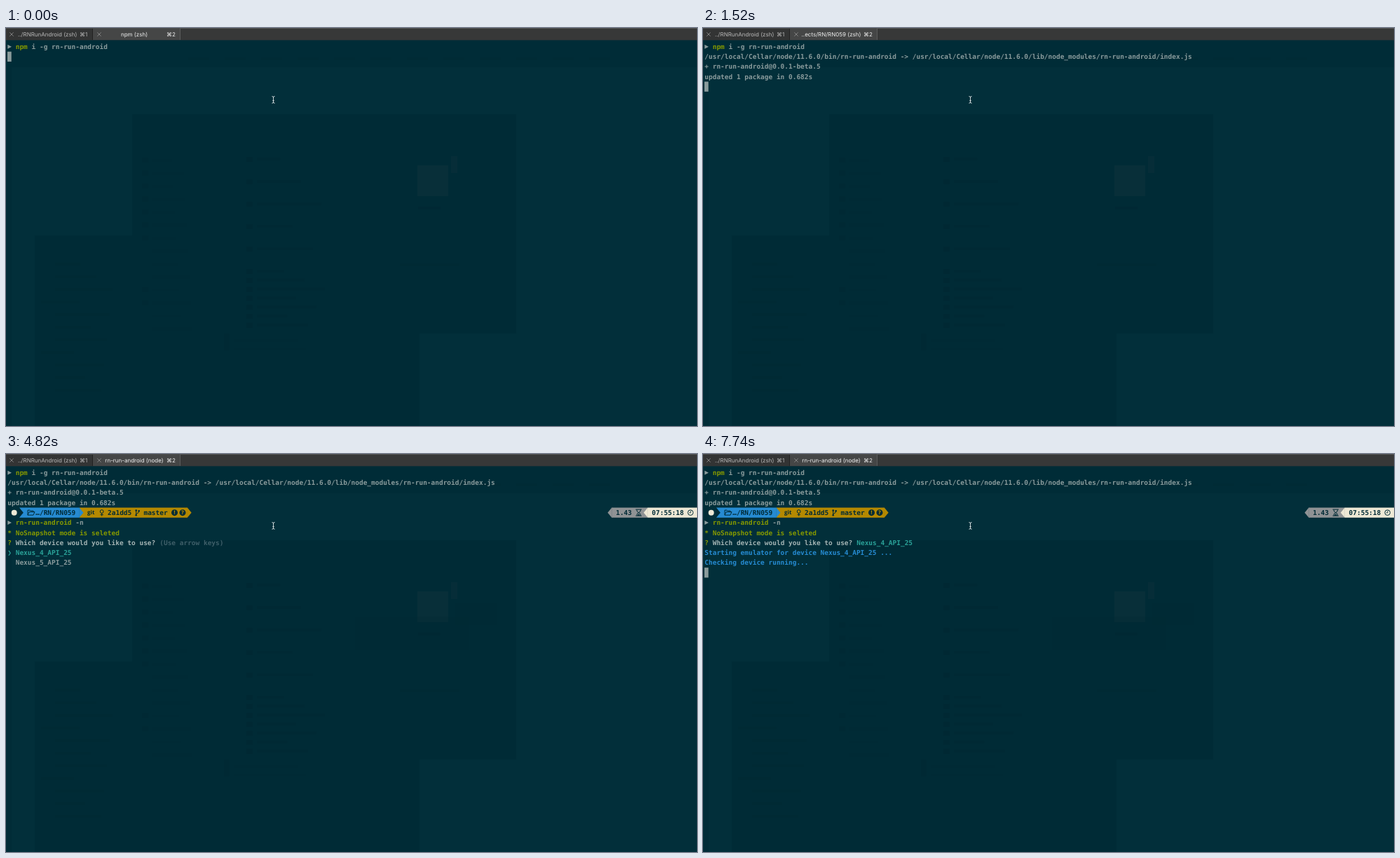
These frames come from a looping animation (986 by 568 pixels, 8000 ms). An HTML page:

```html
<!DOCTYPE html>
<html lang="en">
<head>
<meta charset="utf-8">
<title>Terminal session</title>
<style>
  html, body { margin: 0; width: 100%; height: 100%; overflow: hidden; background: #022f3a; }
  svg { display: block; width: 986px; height: 568px; }
  text { white-space: pre; text-rendering: geometricPrecision; }
  .term { font: bold 9.485px "DejaVu Sans Mono", "DejaVu Sans", monospace; }
  .tab { font: 8px Inter, "DejaVu Sans", sans-serif; }
</style>
</head>
<body>
<svg id="stage" viewBox="0 0 986 568" xmlns="http://www.w3.org/2000/svg"></svg>
<script>
const LOOP = 8000, CELL = 5.71, LINE = 14.27, LEFT = 2, TOP = 19.45;
const C = {
  text: '#8a9b9c', bright: '#a3b3b3', dim: '#3f5f69', green: '#859900', cyan: '#2aa198',
  blue: '#268bd2', pink: '#d33682', gold: '#b58900', dark: '#002b36', cream: '#eee8d5', grey: '#8f9294'
};
const stage = document.getElementById('stage');
const timed = [];
let parent = stage;

const colX = col => LEFT + col * CELL;
const rowY = row => TOP + row * LINE;

function add(tag, attrs, content) {
  const el = document.createElementNS('http://www.w3.org/2000/svg', tag);
  for (const key in attrs) el.setAttribute(key, attrs[key]);
  if (content) el.textContent = content;
  parent.append(el);
  return el;
}
const rect = (x, y, width, height, fill, opacity = 1) => add('rect', { x, y, width, height, fill, opacity });
const path = (d, stroke, width = 1, fill = 'none') => add('path', { d, stroke, 'stroke-width': width, fill });
const circle = (cx, cy, r, fill) => add('circle', { cx, cy, r, fill });
const poly = (points, fill) => add('polygon', { points, fill });
const term = (col, row, str, fill = C.text) =>
  add('text', { class: 'term', x: colX(col) + .3, y: rowY(row) + 10.5, fill }, str);
const tabText = (x, str, fill, anchor = 'start') =>
  add('text', { class: 'tab', x, y: 12.2, fill, 'text-anchor': anchor }, str);
const cell = (col, row, count = 1, fill = C.text) =>
  rect(colX(col), rowY(row), count * CELL, LINE, fill);
const cursor = (col, row) => cell(col, row);

// Everything drawn inside is visible from one time to another.
function during(from, to, draw) {
  const outer = parent, el = add('g', {});
  parent = el;
  draw();
  parent = outer;
  timed.push({ el, from, to });
}

function backdrop() {
  const lowered = '#002b36', ghost = '#00242e';
  rect(0, 0, 986, 568, '#022f3a');
  rect(0, 18, 986, 38, '#002c37');
  rect(0, 56, 8, 512, '#012c37');
  rect(180, 123, 548, 445, lowered);
  rect(41, 296, 139, 272, lowered);
  rect(590, 436, 138, 132, '#022f3a');
  const bar = (x, y, w, alpha = .2) => rect(x, y - 2, w, 4, ghost, alpha);
  for (let i = 0; i < 12; i++) bar(260 + i * 52, 44, 30, .12);
  for (let i = 0; i < 14; i++) {
    const y = 189 + i * 18.5;
    bar(209, y, 28 + (i * 17) % 32, .15);
    if (i < 7 || i === 10 || i === 11) rect(194, y - 4, 9, 7, ghost, .25);
  }
  for (let i = 0; i < 12; i++) {
    const y = i < 5 ? 187 + i * 32 : 347 + (i - 5) * 12.8;
    bar(358, y, 34 + (i * 29) % 70);
    rect(343, y - 3, 9, 7, ghost, .35);
  }
  bar(326, 446, 90, .15);
  bar(326, 458, 102, .15);
  rect(311, 436, 8, 24, ghost, .25);
  for (let i = 0; i < 11; i++) bar(i % 4 === 3 ? 50 : 70, 337 + i * 18, 36 + (i * 23) % 50, .12);
  rect(587, 196, 44, 44, '#0a303a', .8);
  rect(635, 183, 9, 24, '#0a303a', .6);
  bar(588, 257, 32, .3);
  bar(562, 338, 85, .12);
  during(1750, LOOP, () => rect(498, 232, 162, 48, '#002832', .25));
  during(4410, LOOP, () => rect(640, 212, 60, 32, '#002832', .2));
}

function tabBar() {
  rect(0, 0, 986, 18, '#373838');
  rect(0, 0, 123, 18, '#333434');
  rect(124, 0, 124, 18, '#454646');
  rect(248, 0, 738, 1, '#555656');
  rect(0, 0, 248, 1, '#4a4b4b');
  rect(0, 17, 986, 1, '#142f37');
  rect(123, 1, 1, 16, '#222');
  rect(248, 1, 1, 16, '#5b5c5c');
  for (const x of [8, 133]) path(`M${x - 2.7} 6.3l5.4 5.4m0 -5.4l-5.4 5.4`, '#929292', .8);
  tabText(17, '../RNRunAndroid (zsh)', '#b9b9b9');
  tabText(105, '⌘1', '#b9b9b9');
  tabText(229, '⌘2', '#f0f0f0');
  const title = (from, to, str) => during(from, to, () => tabText(183, str, '#f0f0f0', 'middle'));
  title(0, 1520, 'npm (zsh)');
  title(1520, 4110, '..ects/RN/RN059 (zsh)');
  title(4110, 4410, 'rn-run-android (zsh)');
  title(4410, LOOP, 'rn-run-android (node)');
}

function promptMark(row) {
  const y = rowY(row) + 7.3;
  poly(`${LEFT + .3},${y - 3} ${LEFT + 6},${y} ${LEFT + .3},${y + 3}`, C.text);
}

function gauge(done, spinner, stageName, level, prefix, message) {
  const y = rowY(1);
  for (const dx of [0, 2]) {
    path(`M${5.2 + dx} ${y + 2.5}q-4 4.8 0 9.6`, C.text, .9);
    path(`M${111.2 + dx} ${y + 2.5}q4 4.8 0 9.6`, C.text, .9);
  }
  if (done) cell(1, 1, done);
  term(21, 1, spinner);
  term(23, 1, stageName);
  let col = 24 + stageName.length;
  const silly = level === 'sill';
  cell(col, 1, 4, silly ? C.text : '#073642');
  term(col, 1, level, silly ? C.dark : C.blue);
  term(col += 5, 1, prefix, C.pink);
  term(col + prefix.length + 1, 1, message);
}

function statusLine() {
  const y = rowY(4), mid = y + LINE / 2, end = y + LINE;
  const tip = (col, fill) => poly(`${colX(col) - .2},${y} ${colX(col + 1)},${mid} ${colX(col) - .2},${end}`, fill);
  const notch = (col, fill) => poly(`${colX(col + 1) + .2},${y} ${colX(col)},${mid} ${colX(col + 1) + .2},${end}`, fill);

  cell(18, 4, 27, C.gold);
  cell(3, 4, 15, C.blue);
  tip(3, '#022b36');
  tip(18, C.blue);
  tip(45, C.gold);
  circle(11.7, mid, 4, '#eee8d5');

  path(`M31 ${mid + 3.5}v-7h3l1 1h4v2M31 ${mid + 3.5}l2 -4.5h8l-2 4.5z`, C.dark, 1);
  term(7, 4, '…/RN/RN059', C.dark);
  add('text', { x: 116, y: mid + 2.5, fill: C.dark, style: 'font:bold 8px "Open Sans",sans-serif' }, 'git');
  add('circle', { cx: 136.7, cy: mid - 1.6, r: 2.4, fill: 'none', stroke: C.dark });
  path(`M136.7 ${mid + .8}v4M134.6 ${mid + 3}h4.2`, C.dark);
  term(25, 4, '2a1dd5', C.dark);
  path(`M185.7 ${mid - 3}v6.5M189.7 ${mid - 2}q0 3 -4 3.6`, C.dark);
  for (const [x, dy] of [[185.7, -3], [189.7, -2.4], [185.7, 3.6]]) circle(x, mid + dy, 1.3, C.dark);
  term(34, 4, 'master', C.dark);
  for (const [x, mark] of [[240.5, '!'], [252, '?']]) {
    circle(x, mid, 4.5, C.dark);
    add('text', { x, y: mid + 2.7, fill: C.gold, 'text-anchor': 'middle', style: 'font:bold 7.5px "DejaVu Sans",sans-serif' }, mark);
  }

  cell(151, 4, 9, C.grey);
  notch(150, C.grey);
  rect(colX(160), y, 986 - colX(160), LINE, C.cream);
  notch(159, C.cream);
  term(152, 4, '1.43', C.dark);
  path(`M898.5 ${mid - 4.5}h8.5M898.5 ${mid + 4.5}h8.5M900 ${mid - 4}q0 3 2.8 4q-2.8 1 -2.8 4M905.6 ${mid - 4}q0 3 -2.8 4q2.8 1 2.8 4`, C.dark, 1);
  poly(`900.6,${mid + 4} 902.8,${mid + 1.5} 905,${mid + 4}`, C.dark);
  term(161, 4, '07:55:18', C.dark);
  add('circle', { cx: 976.7, cy: mid, r: 3.8, fill: 'none', stroke: C.dark });
  path(`M976.9 ${mid - 2.4}v2.6h-2`, C.dark, .9);
}

function typing() {
  const command = 'rn-run-android', line = command + ' -n';
  const suggest = typed => {
    cursor(2 + typed, 5);
    term(2, 5, line.slice(0, typed), C.green);
    term(2 + typed, 5, line[typed], C.dark);
    term(3 + typed, 5, line.slice(typed + 1), C.pink);
  };
  during(1750, LOOP, () => promptMark(5));
  during(1750, 2700, () => cursor(2, 5));
  during(2700, 2820, () => suggest(1));
  during(2820, 3330, () => suggest(2));
  during(3330, LOOP, () => {
    term(2, 5, command, C.green);
    term(17, 5, '-n');
  });
  during(3330, 4110, () => cursor(19, 5));
  during(4110, LOOP, () => term(0, 6, '* NoSnapshot mode is seleted', C.green));
  during(4110, 4820, () => cursor(0, 7));
}

function deviceMenu() {
  const devices = ['Nexus_4_API_25', 'Nexus_5_API_25'];
  during(4820, LOOP, () => {
    term(0, 7, '?', C.green);
    term(2, 7, 'Which device would you like to use?', C.bright);
  });
  during(4820, 5420, () => term(38, 7, '(Use arrow keys)', C.dim));
  const moves = [4820, 5420, 5770, 6130, 6720, 7080, 7320, 7740];
  for (let i = 0; i < moves.length - 1; i++) {
    during(moves[i], moves[i + 1], () => devices.forEach((name, n) => {
      const chosen = n === i % 2, row = 8 + n;
      if (chosen) term(0, row, '❯', C.cyan);
      term(2, row, name, chosen ? C.cyan : C.text);
    }));
  }
  during(7740, LOOP, () => {
    term(38, 7, devices[0], C.cyan);
    term(0, 8, `Starting emulator for device ${devices[0]} ...`, C.blue);
    term(0, 9, 'Checking device running...', C.blue);
    cursor(0, 10);
  });
}

function install() {
  promptMark(0);
  term(2, 0, 'npm', C.green);
  term(6, 0, 'i -g rn-run-android');
  during(0, 630, () => cursor(0, 1));
  const rollback = ['rollbackFailedOptional:', 'verb', 'npm-session', '3e0a0cd1e9c05e9a'];
  const resolve = name => ['fetchMetadata:', 'sill', 'resolveWithNewModule', name + ' checking installable status'];
  [
    [630, 770, 0, '⠇', ...rollback],
    [770, 920, 0, '⠏', ...rollback],
    [920, 1040, 2, '⠋', ...resolve('inquirer@6.2.1')],
    [1040, 1160, 2, '⠙', ...resolve('minimatch@3.0.4')],
    [1160, 1310, 2, '⠹', ...resolve('brace-expansion@1.1.11')]
  ].forEach(([from, to, ...args]) => during(from, to, () => gauge(...args)));
  during(1310, LOOP, () => {
    const base = '/usr/local/Cellar/node/11.6.0/';
    term(0, 1, `${base}bin/rn-run-android -> ${base}lib/node_modules/rn-run-android/index.js`);
    term(0, 2, '+ rn-run-android@0.0.1-beta.5');
    term(0, 3, 'updated 1 package in 0.682s');
  });
  during(1310, 1750, () => cursor(0, 4));
}

function pointer() {
  path('M379.5 97.5q2 0 2 1.6q0 -1.6 2 -1.6M381.5 98.5v8M379.5 107.3q2 0 2 -1.6q0 1.6 2 1.6M380.3 103.6h2.4', '#dfe6e6', .9);
}

backdrop();
tabBar();
install();
during(1750, LOOP, statusLine);
typing();
deviceMenu();
pointer();

const start = performance.now();
function frame() {
  const t = (performance.now() - start) % LOOP;
  for (const { el, from, to } of timed) el.style.display = t >= from && t < to ? '' : 'none';
  requestAnimationFrame(frame);
}
frame();
</script>
</body>
</html>
```
